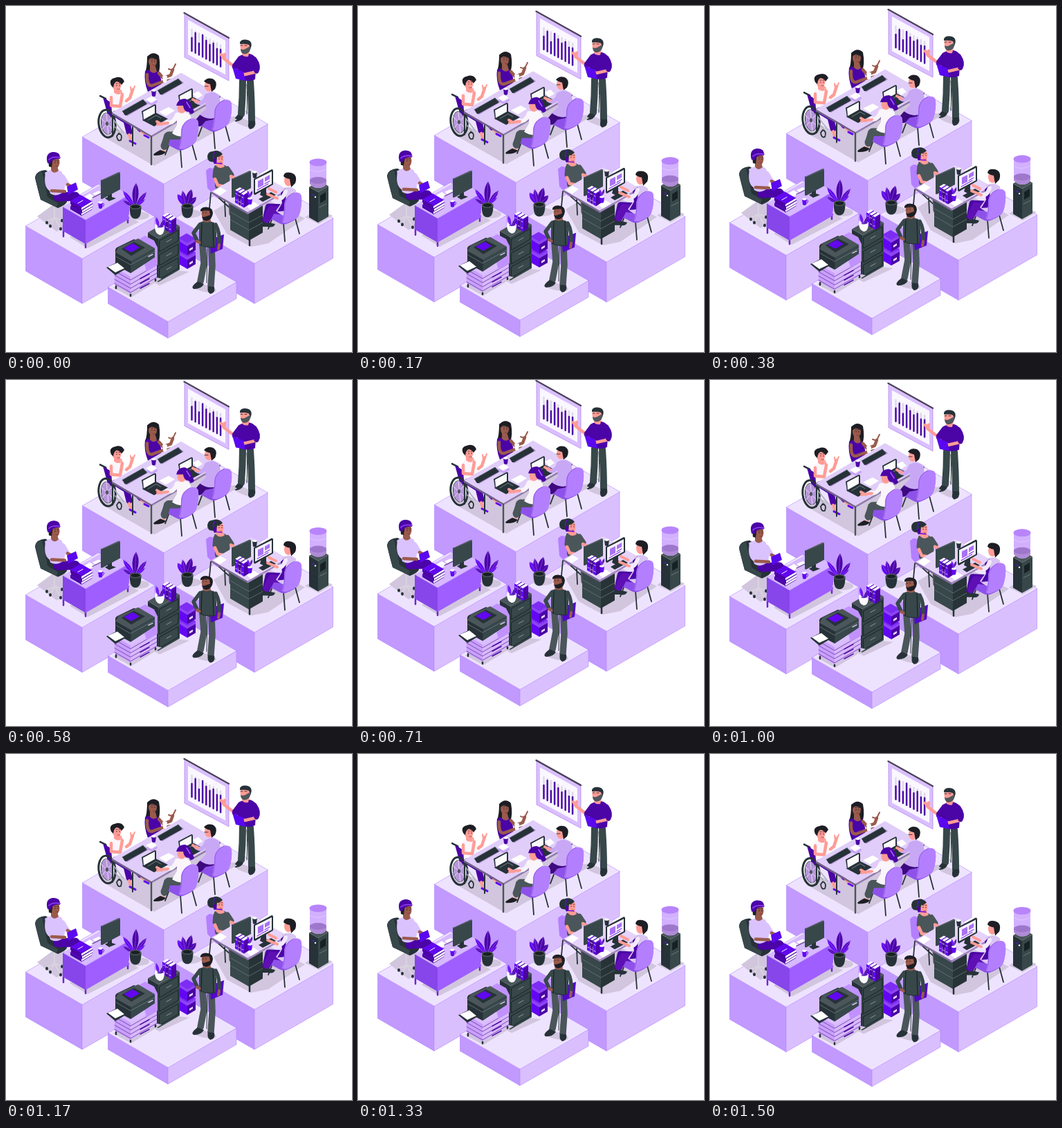
An HTML page with a canvas for the animation above (1.54 s loop, 500 px wide and 500 px high).

```html
<!DOCTYPE html>
<html lang="en">
<head>
<meta charset="utf-8">
<title>Floating office</title>
<style>
html, body { margin: 0; width: 100%; height: 100%; overflow: hidden; background: #fff; }
canvas { display: block; width: 500px; height: 500px; }
</style>
</head>
<body>
<canvas id="stage"></canvas>
<script>
const canvas = document.getElementById('stage');
const ctx = canvas.getContext('2d');
const dpr = window.devicePixelRatio || 1;
canvas.width = canvas.height = 500 * dpr;

const TOP = '#eee3ff', MID = '#dabfff', SIDE = '#c199ff', SEAT = '#b47fff', DESK = '#9f5eff',
  VIVID = '#6208f0', DEEP = '#4b04a6', INK = '#263238', DARK = '#37474a', GREY = '#4a5659',
  SKIN = '#ff9c96', BROWN = '#9a5a4c', WHITE = '#fafafa', SHADE = '#d1c6dd', HAIR = '#1d1e24';
const SLOPE = 0.577;

function fill(color, d) {
  ctx.fillStyle = color;
  ctx.fill(new Path2D(d));
}
function line(color, width, d) {
  ctx.strokeStyle = color;
  ctx.lineWidth = width;
  ctx.stroke(new Path2D(d));
}
function oval(color, x, y, rx, ry = rx, turn = 0) {
  ctx.fillStyle = color;
  ctx.beginPath();
  ctx.ellipse(x, y, rx, ry, turn, 0, 7);
  ctx.fill();
}
function at(x, y, draw) {
  ctx.save();
  ctx.translate(x, y);
  draw();
  ctx.restore();
}
// Isometric box: (x, y) is the near corner of the top, a and b its left and right extents.
function box(x, y, a, b, h, top, left, right) {
  const la = a * SLOPE, lb = b * SLOPE;
  fill(left, `M${x} ${y}l${-a} ${-la}v${h}l${a} ${la}z`);
  fill(right, `M${x} ${y}l${b} ${-lb}v${h}l${-b} ${lb}z`);
  fill(top, `M${x} ${y}l${-a} ${-la}l${b} ${-lb}l${a} ${la}z`);
}
function block(x, y, a, b, h) {
  const la = a * SLOPE, lb = b * SLOPE;
  box(x, y, a, b, h, TOP, SIDE, MID);
  line('#b284ff', 0.6, `M${x} ${y}l${-a} ${-la}l${b} ${-lb}l${a} ${la}zv${h}`
    + `l${-a} ${-la}v${-h}M${x} ${y + h}l${b} ${-lb}v${-h}`);
}

function chairBack() {
  fill(SEAT, 'M250 205Q253 194 253 179Q255 167 267 163Q277 161 278 169Q279 181 275 194Q273 200 260 205Q254 208 250 205Z');
  line('#8a55df', 0.8, 'M251 204Q254 194 254 179Q256 168 267 163');
}
function chair() {
  line(INK, 1.8, 'M235 202L230 215M252 207L254 233M269 200L275 222');
  fill('#8e52ea', 'M230 193Q241 187 255 192L274 194Q274 201 256 208Q251 210 246 207L231 199Z');
  chairBack();
}
function laptopBack(x, y) {
  at(x, y, () => {
    fill('#a98ac9', 'M2 18L34 0L38 3L7 21Z');
    fill(INK, 'M0 14L30 -3L35 2L35 4L6 20L4 20Z');
    line('#55636a', 0.8, 'M0 14L30 -3L35 3');
  });
}
function laptopFront(x, y) {
  at(x, y, () => {
    fill(INK, 'M0 23L19 12L37 21L17 32Z');
    line('#758087', 1, 'M8 23L20 16L27 20');
    fill(INK, 'M-1 10L18 0Q20 0 20 2V13L1 24Z');
    fill(WHITE, 'M1 11L18 2V13L2 22Z');
  });
}
function mug(x, y, color) {
  fill(color, `M${x - 3} ${y}h7l-1 8q-2.500 2 -5 0z`);
  oval(WHITE, x + 0.5, y, 3.4, 1.7);
}
function pot(x, y) {
  fill(INK, `M${x - 8.5} ${y}q0 13 4 16q4.500 3 9 0q4 -3 4 -16z`);
  oval(GREY, x, y, 8.5, 4);
  oval('#191f22', x, y, 6.5, 2.6);
}
function leaf(color, x, y, tx, ty, width) {
  const dx = tx - x, dy = ty - y, k = width / Math.hypot(dx, dy);
  const mx = x + dx * 0.6, my = y + dy * 0.6;
  fill(color, `M${x} ${y}Q${mx + dy * k} ${my - dx * k} ${tx} ${ty}Q${mx - dy * k} ${my + dx * k} ${x} ${y}Z`);
  line('#a466ff', 0.5, `M${x} ${y}L${tx} ${ty}`);
}
function books(x, y) {
  at(x, y, () => {
    fill(WHITE, 'M0 0L7 -4L20 3L13 8Z');
    [VIVID, DEEP, VIVID].forEach((color, i) => {
      const left = i * 4.5, top = i * 2.6;
      fill(color, `M${left} ${top}l4 2.300v18l-4 -2.300z`);
      line(color, 1.2, `M${left + 4} ${top + 2}l6.500 -4`);
      line('#dec8ff', 1, `M${left + 1} ${top + 5}l2 1m-2 8l2 1`);
    });
    fill(DEEP, 'M13 7.500L20 3.500V21L13 25.500Z');
  });
}
function monitorBack(x, y) {
  at(x, y, () => {
    fill(INK, 'M10 31L16 28V36L22 38L12 42L6 38L10 36Z');
    fill('#1d272b', 'M0 12L1 11V39L0 38Z');
    fill(DARK, 'M0 12L26 0Q28 0 28 2V25L2 39Q0 39 0 37Z');
    line('#6b767a', 0.7, 'M1 12L27 1');
  });
}
// Brows, eyes and mouth around (x, y); side is -1 when looking left, 1 when looking right.
function face(x, y, side) {
  line(HAIR, 0.7, `M${x - 2} ${y - 3}h2M${x + 2 * side} ${y - 3}h${2 * side}`);
  oval(HAIR, x - 1, y, 0.7);
  oval(HAIR, x + 3 * side, y, 0.7);
  line('#7c2f38', 0.7, `M${x} ${y + 5}q${1.5 * side} 1 ${3 * side} 0`);
}

function whiteboard() {
  fill(MID, 'M258 12L322 47V108L258 74Z');
  line('#b78af1', 0.8, 'M258 12V74L322 108V47');
  fill('#faf7ff', 'M263 20L317 50V99L263 70Z');
  const tops = [46, 39, 54, 42, 50, 56, 54, 62, 63];
  tops.forEach((top, i) => {
    const x = 268.5 + i * 5.2, base = 65 + i * 2.8;
    line('#ded8e6', 2.4, `M${x} ${34 + i * 2.8}V${base}`);
    line(DEEP, 2.4, `M${x} ${top}V${base}`);
  });
  line('#4b405b', 2.3, 'M257.500 10L322 46');
}

function presenter() {
  oval(SHADE, 343, 168, 18, 5, 0.4);
  line(DARK, 10, 'M342 108Q342 133 340 156M353 109Q355 139 355 166');
  line('#263033', 1, 'M348 113Q349 129 348 156');
  fill(INK, 'M335 157L343 160Q341 166 332 167Q327 165 335 157ZM351 166L360 166Q362 176 353 178Q348 176 351 166Z');
  line(SKIN, 4.5, 'M334 91L315 76L311 70M315 76L316 70');
  fill(DEEP, 'M336 73Q342 69 352 69Q360 71 362 78L360 106Q350 111 336 105L335 91L327 90L327 85Z');
  fill(SKIN, 'M342 64L352 65L350 73Q344 74 341 70Z');
  line(SKIN, 4.5, 'M362 95L345 99L339 98');
  line(DEEP, 7, 'M359 77Q366 87 362 94');
  fill('#5a08ef', 'M327 88L343 95L346 108L332 105Z');
  oval(SKIN, 345, 59, 6.5, 8.5);
  fill(INK, 'M338 55Q337 49 345 48.500Q356 49 354.500 58L353 63L351 56Q346 54 338 55Z');
  fill('#50575c', 'M339 62Q342 64 346 62L353 58L353 63Q351 69 344 69.500Q339 68 339 62Z');
  line(HAIR, 0.8, 'M339 57h3M345 57h3');
}

function seatedSpeaker() {
  fill(HAIR, 'M204 73Q213 64 221 72Q224 88 220 98Q208 104 201 96Q204 89 204 73Z');
  fill(DEEP, 'M201 94Q210 90 220 94Q226 104 224 120L205 124Q199 109 201 94Z');
  fill(BROWN, 'M208 86L216 87L218 95Q213 99 208 94Z');
  oval(BROWN, 212, 80, 6, 8);
  fill(HAIR, 'M205 78Q206 69 213 70Q220 71 219 78Q214 75 210 75Z');
  face(212, 80, 1);
  line(BROWN, 4.5, 'M221 97L227 104L238 100L241 92M204 99Q203 116 211 115L230 108');
  line(BROWN, 2, 'M241 93L235 91M241 92L245 84M230 108L237 106');
}

function wheelchair() {
  oval(SHADE, 160, 188, 26, 10, 0.4);
  line(INK, 2.5, 'M136 130L144 134L149 151');
  fill(DEEP, 'M140 132L151 139L157 160L148 161Z');
  fill('#faf6fc', 'M151 127Q159 121 169 127L174 150Q164 157 153 153Z');
  fill(SKIN, 'M156 118L165 119L166 127Q160 129 156 125Z');
  oval(SKIN, 160, 114, 6.5, 8.5);
  fill(HAIR, 'M152 115Q148 106 157 104Q167 100 171 109L167 114Q165 110 160 109Q156 110 155 118Z');
  face(161, 115, 1);
  line(SKIN, 4.5, 'M152 132L152 144L165 145L168 128M174 137L179 133L183 121');
  line(SKIN, 2, 'M168 128L166 122M183 123L186 116M181 124L180 117');
  line(DEEP, 9, 'M158 156L174 166L178 182');
  line('#6515b8', 8, 'M166 156L188 171L194 178');
  line(SKIN, 4, 'M178 186L180 193M196 181L202 187');
  line(VIVID, 3, 'M179 195L187 199M200 187L206 190');
  ctx.strokeStyle = INK;
  for (const [w, rx, ry] of [[3, 12, 20], [1, 8.5, 15.5]]) {
    ctx.lineWidth = w;
    ctx.beginPath();
    ctx.ellipse(146, 170, rx, ry, -0.13, 0, 7);
    ctx.stroke();
  }
  oval('#b795da', 146, 170, 8, 15, -0.13);
  line('#f0e9f6', 0.8, 'M138 163L154 178M138 179L154 161M145 155L148 186');
  oval(GREY, 146, 170, 2, 3);
  line('#aab0b4', 1.6, 'M155 164L170 183M158 175L165 184');
  line(INK, 1.8, 'M163 184Q169 186 166 194Q161 196 160 188Z');
}

function tableShadow() {
  fill(SHADE, 'M153 196L214 231L334 164L263 126Z');
}
function table() {
  line(INK, 2, 'M154 156V188M183 172V202M302 143V176');
  box(210, 187, 57, 100, 3, '#e0cdf9', '#6f6383', '#8f7ba8');
  line(GREY, 2.4, 'M210 189V229');
  laptopBack(168, 138);
  laptopBack(219, 108);
  fill('#fff', 'M202 135L211 130L218 135L209 140ZM221 153L235 146L244 151L231 159ZM270 127L278 123L284 129L276 134Z');
  fill('#c7a2f7', 'M204 137L211 141L218 136L219 139L211 144L203 140Z');
  mug(213, 122, DEEP);
  mug(229, 102, '#fff');
}

function meetingCouple() {
  laptopFront(197, 142);
  laptopFront(250, 119);

  at(48, -27, chair);
  line('#3d097e', 12, 'M300 158L285 161L279 168');
  fill('#c8a8f5', 'M287 128Q297 121 307 128Q313 142 307 160Q294 167 280 157L289 148Z');
  line('#c8a8f5', 6, 'M290 130Q284 145 275 138');
  line(SKIN, 4, 'M277 139L270 135');
  oval(SKIN, 293, 115, 6, 8.5);
  fill(HAIR, 'M286 109Q290 103 298 105Q307 109 302 120L297 124L295 113Q290 112 286 109Z');
  line(HAIR, 0.8, 'M287 116h5');
  at(48, -27, chairBack);

  line(GREY, 11, 'M258 187L235 187L229 202');
  line(SKIN, 3.5, 'M229 205L227 211');
  fill(HAIR, 'M223 208L231 211Q228 216 215 216Q209 215 223 208Z');
  chair();
  line(GREY, 10, 'M250 188L233 188L229 203');
  fill('#f9f5fa', 'M247 155Q257 150 266 157Q272 171 263 186Q252 192 240 184L247 172Z');
  line('#f9f5fa', 6, 'M247 157Q242 171 233 168');
  line(SKIN, 4, 'M234 169L219 171M225 171L218 167');
  oval(SKIN, 254, 147, 6.5, 8);
  fill(DEEP, 'M246 144Q249 133 259 134Q266 136 268 144L272 153Q268 159 264 153Q257 153 256 144Z');
  line('#a266ff', 1.5, 'M261 139L266 147');
  chairBack();
}

function leftOffice() {
  block(110, 365, 81.5, 105, 65);
  fill(SHADE, 'M45 304L75 282L114 304L73 326ZM92 334L156 293L192 312L118 350Z');
  line('#d8d3de', 2.2, 'M70 288V307M70 306L59 311M70 306L80 309M70 306L79 321M70 306L64 317');
  for (const [x, y] of [[59, 313], [79, 322], [64, 318], [81, 310]]) oval(INK, x, y, 2, 2.5);
  fill(INK, 'M42 247Q44 238 57 237L68 243L74 276L87 279Q92 285 75 292L50 279Q46 266 42 247Z');
  fill(DARK, 'M42 249Q43 241 52 239Q57 259 60 276L75 285L73 291L50 280Z');
  line(DEEP, 13, 'M75 276L100 275L108 285');
  fill('#dac2ff', 'M56 241Q68 233 80 239Q88 252 84 268Q73 277 64 271Z');
  fill(BROWN, 'M65 230L74 231L76 238Q69 244 65 237Z');
  oval(BROWN, 71, 226, 6.5, 9);
  fill(HAIR, 'M61 221Q64 215 68 219L66 233L62 232Z');
  fill(DEEP, 'M60 227Q56 213 67 211Q79 210 78 221Q68 219 64 228Z');
  line('#8a3bef', 1.8, 'M62 222Q67 217 78 219');
  face(72, 226, 1);
  line('#dac2ff', 7, 'M60 245Q58 261 66 265M82 247L88 257');
  line(BROWN, 4.5, 'M66 267L85 268M89 258L95 261');
  fill('#5a08ef', 'M88 261L101 255L104 265L90 273Z');

  line('#6f27cf', 2.5, 'M83 318V333M115 337V349M176 302V313');
  box(115, 309, 33, 63, 35, '#d6b9ff', '#8646ea', DESK);
  line('#c194ff', 0.8, 'M82 290L115 309L178 273');
  fill('#fff', 'M111 277L121 271L129 276L118 282ZM125 271L134 267L139 270L130 275Z');
  line('#7952a4', 1.5, 'M125 277L137 271');
  monitorBack(137, 240);
  mug(136, 284, VIVID);
  line(VIVID, 1, 'M139 285Q144 285 140 290');
  for (let i = 0; i < 3; i++) {
    at(i % 2, -i * 4, () => {
      box(109, 299, 16, 15, 4, VIVID, DEEP, WHITE);
      line(DEEP, 0.8, 'M93 290L109 299L124 290M109 303L124 294');
    });
  }
  line('#fff', 1, 'M104 285L111 281');

  oval(SHADE, 192, 303, 15, 6);
  leaf(DEEP, 186, 290, 188, 256, 9);
  leaf(VIVID, 186, 290, 169, 267, 6);
  leaf('#5a0cc2', 187, 290, 203, 269, 6);
  leaf(DEEP, 186, 291, 169, 281, 4);
  leaf(VIVID, 187, 290, 201, 279, 4);
  pot(187, 290);
}

function rightOffice() {
  block(359, 372, 114, 113.5, 58);
  oval(SHADE, 267, 300, 15, 6);
  leaf(DEEP, 261, 290, 268, 265, 9);
  leaf(VIVID, 260, 290, 248, 272, 8);
  leaf(DEEP, 262, 290, 275, 276, 7);
  leaf('#5a0cc2', 260, 291, 255, 267, 7);
  pot(262, 289);
  fill(SHADE, 'M300 296L350 266L432 307L379 343L354 348L319 329Z');

  line(INK, 1.8, 'M296 270L294 292M316 281L317 304M306 276L326 294');
  fill(SEAT, 'M289 238Q296 230 301 238L309 268L318 277L304 277L291 263Z');
  line(GREY, 9, 'M310 269L326 282L327 300');
  fill(GREY, 'M301 231Q312 225 320 233Q327 249 320 268Q307 275 302 261Z');
  fill(SKIN, 'M303 223L313 226L316 232Q308 237 303 230Z');
  oval(SKIN, 308, 221, 6.5, 8.5);
  fill(INK, 'M301 225Q291 227 291 217Q292 210 299 210Q307 207 313 214Q309 218 305 218Q305 224 301 229Z');
  face(309, 221, 1);
  line(VIVID, 1.4, 'M301 212Q298 219 302 225M303 227L312 228');
  oval(DEEP, 302, 224, 2.5, 4);
  line(GREY, 7, 'M303 236L302 246M320 235L326 244');
  line(SKIN, 4.5, 'M302 250L306 259L322 262M325 246L333 250');

  box(351, 300, 27, 20, 39, INK, DARK, '#273336');
  line('#66767a', 0.8, 'M325 298L351 313L371 302M325 309L351 324L371 313');
  line(INK, 2.5, 'M352 335V346M402 273V294');
  box(349, 298, 52, 57, 3, '#e5d3fb', '#7d6a95', '#a187c2');
  fill('#fff', 'M300 268L310 262L319 267L309 274ZM347 289L358 283L366 288L354 295Z');
  mug(359, 240, INK);
  monitorBack(326, 238);
  books(331, 266);
  mug(352, 278, VIVID);
  leaf(VIVID, 352, 277, 349, 267, 3);
  leaf(DEEP, 352, 277, 356, 267, 3);
  fill(INK, 'M369 266L376 263V270L382 272L373 276L367 273Z');
  fill(INK, 'M358 250L384 236Q386 236 386 238V258L360 273Q358 273 358 271Z');
  fill('#f7f1fe', 'M360 251L384 239V257L360 270Z');
  fill('#a873f2', 'M364 253L372 249V259L364 263ZM374 248L381 244V250L374 254Z');
  line(VIVID, 1, 'M374 257L381 253M363 266L379 257');
  fill(INK, 'M365 279L383 269L390 273L371 283Z');

  line(DEEP, 11, 'M402 292L380 291L376 310');
  fill(INK, 'M371 311L380 313L389 315Q387 321 378 319L371 319Z');
  at(149, 107, chair);
  line('#5e10b4', 11, 'M399 296L384 294L377 308');
  fill('#d9c5f3', 'M399 264Q410 258 419 266Q423 285 412 303Q400 306 390 296L399 283Z');
  fill(DEEP, 'M397 270L404 264L405 296L392 297L399 285Z');
  line('#f2eafb', 6, 'M404 268Q399 282 391 277');
  line(SKIN, 4, 'M392 278L378 272M390 269L380 264');
  oval(SKIN, 408, 252, 6, 8.5);
  fill(HAIR, 'M401 246Q402 239 412 241Q422 244 418 256L412 262L410 250Q404 249 401 246Z');
  at(149, 107, chairBack);
  cooler();
}

function cooler() {
  fill(SHADE, 'M432 305L450 294L472 303L452 315Z');
  box(451, 269, 13, 15, 44, GREY, INK, DARK);
  fill('#172125', 'M454 274L462 269V280L454 285Z');
  line('#788486', 0.8, 'M453 291L463 286');
  oval(VIVID, 444, 273, 1.3);
  oval('#fff', 447, 276, 1.2);
  fill('#d2b0ff', 'M439 226V257Q444 263 451 263Q460 263 463 257V226Z');
  fill('#b08bd8', 'M439 251V257Q444 263 451 263Q460 263 463 257V251Z');
  oval('#9e77cc', 451, 252, 12, 5);
  oval('#b884fb', 451, 226, 12.5, 5.5);
  line('#e3cfff', 0.8, 'M439 236Q449 243 463 236');
}

function printer() {
  fill(SHADE, 'M155 407L190 386L225 394L181 421Z');
  box(180, 391, 23, 38, 25, MID, '#c99fff', '#d8b9ff');
  for (let y = 396; y < 416; y += 6) line('#7d50ad', 1, `M157 ${y - 13}L180 ${y}L218 ${y - 22}`);
  line(DEEP, 1.5, 'M194 394L207 387M194 401L207 394M194 408L207 401');
  line(INK, 2.5, 'M159 405v3M180 417v2M216 395v2');
  fill('#c192ff', 'M190 338L201 332L214 339L219 349V374L203 383Z');
  fill(INK, 'M158 355Q157 350 162 348L185 337L215 351V363L180 386L158 374Z');
  fill(GREY, 'M158 356L181 369L215 350L191 336L163 348Z');
  fill(DARK, 'M181 369L215 350V363L180 386Z');
  line('#839094', 0.6, 'M159 362L180 374L215 355');
  fill(INK, 'M167 351L185 341L201 349L181 361Z');
  fill(VIVID, 'M170 350L183 343L193 349L181 356Z');
  fill(INK, 'M145 378L161 370L173 380L158 389Z');
  fill('#fff', 'M147 377L161 371L171 379L158 385Z');
  line('#d6c6ef', 1.5, 'M206 362L212 359');
}

function cabinet() {
  fill(SHADE, 'M202 393L222 379L265 384L222 404Z');
  for (const y of [368, 348]) {
    box(262, y - 5, 13, 12, 17, '#7d2cf3', VIVID, DEEP);
    fill('#8d45f3', `M249 ${y - 13}L262 ${y - 5}L274 ${y - 12}V${y - 8}L262 ${y - 1}L249 ${y - 9}Z`);
    fill('#eadbff', `M265 ${y + 3}L270 ${y}V${y + 3}L265 ${y + 6}Z`);
  }
  box(220, 336, 15, 31, 63, GREY, INK, DARK);
  for (const y of [339, 359, 379]) {
    line('#192327', 1, `M222 ${y}L249 ${y - 15}V${y}L222 ${y + 16}Z`);
    line('#8b9799', 1, `M232 ${y + 2}L239 ${y - 2}`);
  }
  books(226, 303);
  leaf(VIVID, 221, 321, 217, 305, 4);
  leaf(DEEP, 222, 321, 229, 309, 4);
  fill(WHITE, 'M215 318Q222 323 229 318Q229 331 222 331Q215 329 215 318Z');
}

function visitor() {
  oval(SHADE, 287, 408, 17, 5, 0.2);
  line(GREY, 9.5, 'M284 345L286 372L281 398M297 347L298 376L296 405');
  line('#323d40', 1, 'M291 350L290 400');
  fill(INK, 'M277 398L286 402Q282 409 272 409Q265 407 277 398ZM292 405L301 406Q303 415 295 416Q290 413 292 405Z');
  fill('#5208c9', 'M294 338L315 330L313 351L296 358Z');
  fill(DARK, 'M279 313Q290 308 301 313Q306 326 303 347Q291 351 279 344Z');
  line(DARK, 5.5, 'M280 316L271 328L276 339M303 316Q309 327 308 342');
  line(BROWN, 4, 'M276 340L280 342M308 345L307 351');
  fill(BROWN, 'M285 304L295 305L296 311Q289 315 284 310Z');
  oval(BROWN, 289, 300, 6.5, 8.5);
  fill(HAIR, 'M281 297Q280 291 289 290.500Q299 291 299 299Q298 309 290 310.500Q284 310 283 304Q286 306 289 304L295 302L294 296Q288 294 281 297Z');
  face(286, 299, 1);
  line('#161c1f', 1, 'M283 314L282 346M299 314L300 347');
  line(INK, 1.3, 'M280 345Q290 350 302 348');
}

function scene() {
  block(228, 257, 117.5, 150, 65);
  whiteboard();
  presenter();
  seatedSpeaker();
  tableShadow();
  wheelchair();
  table();
  meetingCouple();
  leftOffice();
  rightOffice();
  block(234, 456, 86.5, 99, 24);
  cabinet();
  printer();
  visitor();
}

const PERIOD = 1540, STEP = 125 / 3, LIFT = 10, LOWEST_AT = 1470, BASE = 0.9;

// Constant-speed rise and fall, advancing 24 times a second.
function lift(ms) {
  const t = Math.floor((ms % PERIOD) / 10) * 10;
  const held = Math.floor((t + 4.9) / STEP) * STEP;
  const phase = ((held - LOWEST_AT + PERIOD) % PERIOD) / PERIOD;
  return BASE - LIFT * (1 - Math.abs(2 * phase - 1));
}

const start = performance.now();
function draw(now) {
  ctx.setTransform(dpr, 0, 0, dpr, 0, 0);
  ctx.fillStyle = '#fff';
  ctx.fillRect(0, 0, 500, 500);
  ctx.lineCap = ctx.lineJoin = 'round';
  ctx.translate(0, lift(Math.max(0, now - start)));
  scene();
}
function frame(now) {
  draw(now);
  requestAnimationFrame(frame);
}
draw(start);
requestAnimationFrame(frame);
</script>
</body>
</html>
```
